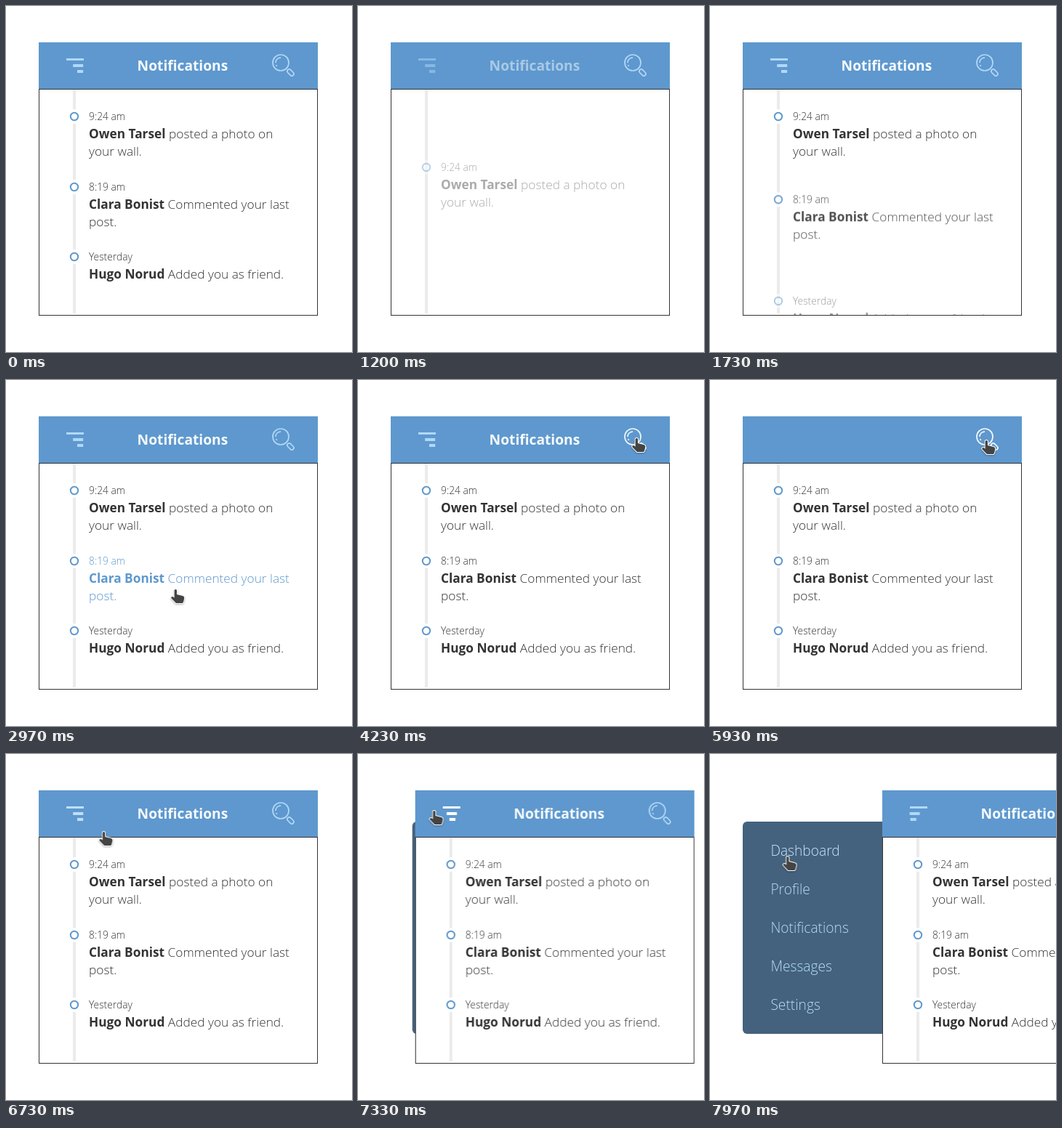
An HTML page that plays this animation: 476 px wide and 476 px high, repeating every 8 s.

```html
<!DOCTYPE html>
<html lang="en">
<head>
<meta charset="utf-8">
<title>Notifications</title>
<style>
  html, body { margin: 0; width: 100%; height: 100%; overflow: hidden; background: #fff; }
  svg { display: block; width: 476px; height: 476px; font-family: "Open Sans", sans-serif; font-weight: 300; }
  svg * { animation: 0s linear infinite; animation-duration: 8s; }

  .bar { fill: #5e98ce; }
  .title { font-size: 19.2px; font-weight: 700; fill: #f6fafd; }
  .item { fill: #333; }
  .time { font-size: 13.82px; }
  .text { font-size: 17.28px; }
  .name { font-weight: 700; }
  .menu { font-size: 19.2px; fill: #b4dbf7; }
  .ring { fill: #fff; stroke: #5e98ce; stroke-width: 2; }
  .icon { fill: #b0d8f8; }
  .lens { fill: none; stroke: #b0d8f8; stroke-width: 1.7; stroke-linecap: round; }
  .hand { fill: #444; stroke: #fff; stroke-width: 2; stroke-linejoin: round; paint-order: stroke;
          filter: drop-shadow(0 1px 1px rgba(0, 0, 0, .3)); }

  /* 1% of the loop is 80 ms */
  .i1 { animation-name: rise1, hover1; }
  .i2 { animation-name: rise2, hover2; }
  .i3 { animation-name: rise3, hover3; }
  @keyframes rise1 {
    0%, 12.49% { opacity: 1; transform: none; }
    12.5% { opacity: 0; transform: translateY(120px); animation-timing-function: ease-out; }
    21.5%, 100% { opacity: 1; transform: none; }
  }
  @keyframes rise2 {
    0%, 12.49% { opacity: 1; transform: none; }
    12.5%, 15.5% { opacity: 0; transform: translateY(120px); animation-timing-function: ease-out; }
    24.5%, 100% { opacity: 1; transform: none; }
  }
  @keyframes rise3 {
    0%, 12.49% { opacity: 1; transform: none; }
    12.5%, 18.6% { opacity: 0; transform: translateY(120px); animation-timing-function: ease-out; }
    27.6%, 100% { opacity: 1; transform: none; }
  }
  @keyframes hover3 { 0%, 29.2%, 36.8%, 100% { fill: #333; } 31.9%, 34% { fill: #5e98ce; } }
  @keyframes hover2 { 0%, 34.2%, 42.6%, 100% { fill: #333; } 37%, 40% { fill: #5e98ce; } }
  @keyframes hover1 { 0%, 40.6%, 48.2%, 100% { fill: #333; } 43.2%, 45.6% { fill: #5e98ce; } }

  .head { animation-name: head; }
  @keyframes head {
    0%, 12.49% { opacity: 1; transform: none; }
    12.5% { opacity: 0; transform: none; }
    17.5%, 61.62% { opacity: 1; transform: none; }
    63.5%, 76.24% { opacity: 0; transform: none; }
    76.25% { opacity: 0; transform: translateX(-44px); animation-timing-function: ease-out; }
    82.5%, 100% { opacity: 1; transform: none; }
  }
  .field { fill: #fff; animation-name: field; }
  @keyframes field {
    0%, 61.62% { opacity: 0; transform: translateX(18px); animation-timing-function: ease-out; }
    66.6%, 74.1% { opacity: 1; transform: none; }
    74.11%, 100% { opacity: 0; transform: none; }
  }

  .lens { animation-name: lens; }
  @keyframes lens {
    0%, 50.5%, 79.5%, 100% { stroke: #b0d8f8; }
    53.2%, 77% { stroke: #f4f9fe; }
  }
  .icon { animation-name: icon; }
  @keyframes icon {
    0%, 83.7%, 99.6%, 100% { fill: #b0d8f8; }
    86.2%, 97.1% { fill: #fff; }
  }
  .mid { animation-name: mid; }
  .low { animation-name: low; }
  @keyframes mid { 0%, 90.6% { transform: none; } 93.1%, 100% { transform: translateX(-9.6px); } }
  @keyframes low { 0%, 90.6% { transform: none; } 93.1%, 100% { transform: translateX(-14.4px); } }

  .panel { animation-name: panel; }
  .side { animation-name: side; }
  @keyframes panel {
    0%, 90.79% { transform: none; animation-timing-function: ease; }
    96.63%, 100% { transform: translateX(192px); }
  }
  @keyframes side {
    0%, 90.79% { transform: translateX(36px); animation-timing-function: ease; }
    96.63%, 100% { transform: none; }
  }
  .first { animation-name: first; }
  @keyframes first { 0%, 98.4% { fill: #b4dbf7; } 99.6%, 100% { fill: #c6e5fb; } }

  .hand { animation-name: hand; }
  @keyframes hand {
    0%, 22.87% { transform: translate(226px, 480px); animation-timing-function: ease-in-out; }
    32.1%, 33.37% { transform: translate(226px, 357px); animation-timing-function: ease-in-out; }
    37.1%, 39.62% { transform: translate(226px, 287px); animation-timing-function: ease-in-out; }
    43.4%, 45.37% { transform: translate(243px, 187px); animation-timing-function: ease-in-out; }
    52.87% { transform: translate(376px, 79px); animation-timing-function: ease-in-out; }
    55.37%, 55.87% { transform: translate(367px, 88px); animation-timing-function: ease-out; }
    57.5%, 76.25% { transform: translate(373px, 82px); animation-timing-function: ease-in; }
    78.6% { transform: translate(322px, 134px); }
    80.9% { transform: translate(238px, 160px); }
    83.2% { transform: translate(152px, 130px); animation-timing-function: ease-out; }
    86.25%, 97.12% { transform: translate(97.5px, 77px); animation-timing-function: ease-in-out; }
    99.62%, 100% { transform: translate(99.5px, 140px); }
  }
</style>
</head>
<body>
<svg viewBox="0 0 476 476">
  <defs>
    <clipPath id="page"><rect x="46" y="115" width="382" height="310"/></clipPath>
    <g id="dot">
      <circle cx="94" cy="152" r="10" fill="#fff"/>
      <circle class="ring" cx="94" cy="152" r="5.2"/>
    </g>
  </defs>

  <g class="side">
    <rect x="45" y="93" width="240" height="292" rx="6" fill="#44627e"/>
    <g class="menu">
      <text class="first" x="83.4" y="139.5">Dashboard</text>
      <text x="83.4" y="192.7">Profile</text>
      <text x="83.4" y="245.9">Notifications</text>
      <text x="83.4" y="299.1">Messages</text>
      <text x="83.4" y="352.3">Settings</text>
    </g>
  </g>

  <g class="panel">
    <rect x="45.5" y="114.5" width="383" height="311" fill="#fff" stroke="#333"/>
    <rect class="bar" x="45" y="50" width="384" height="64"/>

    <g class="head">
      <g class="icon">
        <rect x="83" y="72" width="24" height="3"/>
        <rect class="mid" x="92.2" y="80" width="14" height="4"/>
        <rect class="low" x="98" y="88" width="8.2" height="4"/>
      </g>
      <text class="title" x="180.6" y="89">Notifications</text>
    </g>
    <rect class="field" x="85" y="63" width="248" height="38" rx="3"/>

    <g class="lens">
      <circle cx="378" cy="78" r="11"/>
      <path d="M371 77.5a7 7 0 0 1 6.4-6.4M371.9 81.6l.5.8"/>
      <rect x="386.2" y="88.8" width="10.4" height="5.4" rx="2.5" transform="rotate(45 391.4 91.5)"/>
    </g>

    <g clip-path="url(#page)">
      <rect x="92" y="115" width="4" height="308" fill="#ebebeb"/>
      <g class="item i1">
        <use href="#dot"/>
        <text class="time" x="114" y="157">9:24 am</text>
        <text class="text" x="114" y="182"><tspan class="name">Owen Tarsel</tspan> posted a photo on</text>
        <text class="text" x="114" y="206">your wall.</text>
      </g>
      <g class="item i2">
        <use href="#dot" y="97"/>
        <text class="time" x="114" y="254">8:19 am</text>
        <text class="text" x="114" y="279"><tspan class="name">Clara Bonist</tspan> Commented your last</text>
        <text class="text" x="114" y="303">post.</text>
      </g>
      <g class="item i3">
        <use href="#dot" y="193"/>
        <text class="time" x="114" y="350">Yesterday</text>
        <text class="text" x="114" y="375"><tspan class="name">Hugo Norud</tspan> Added you as friend.</text>
      </g>
    </g>
  </g>

  <path class="hand" d="M5.6 2.6a1.7 1.7 0 0 1 3.4 0V8l8 2q2.6.7 2.2 3.4l-.9 4.2q-.3 1.4-1.4 2.4H8L1.6 13.4q-.9-1.3.3-2.1t2.4.2l1.3 1.3z"/>
</svg>
</body>
</html>
```
